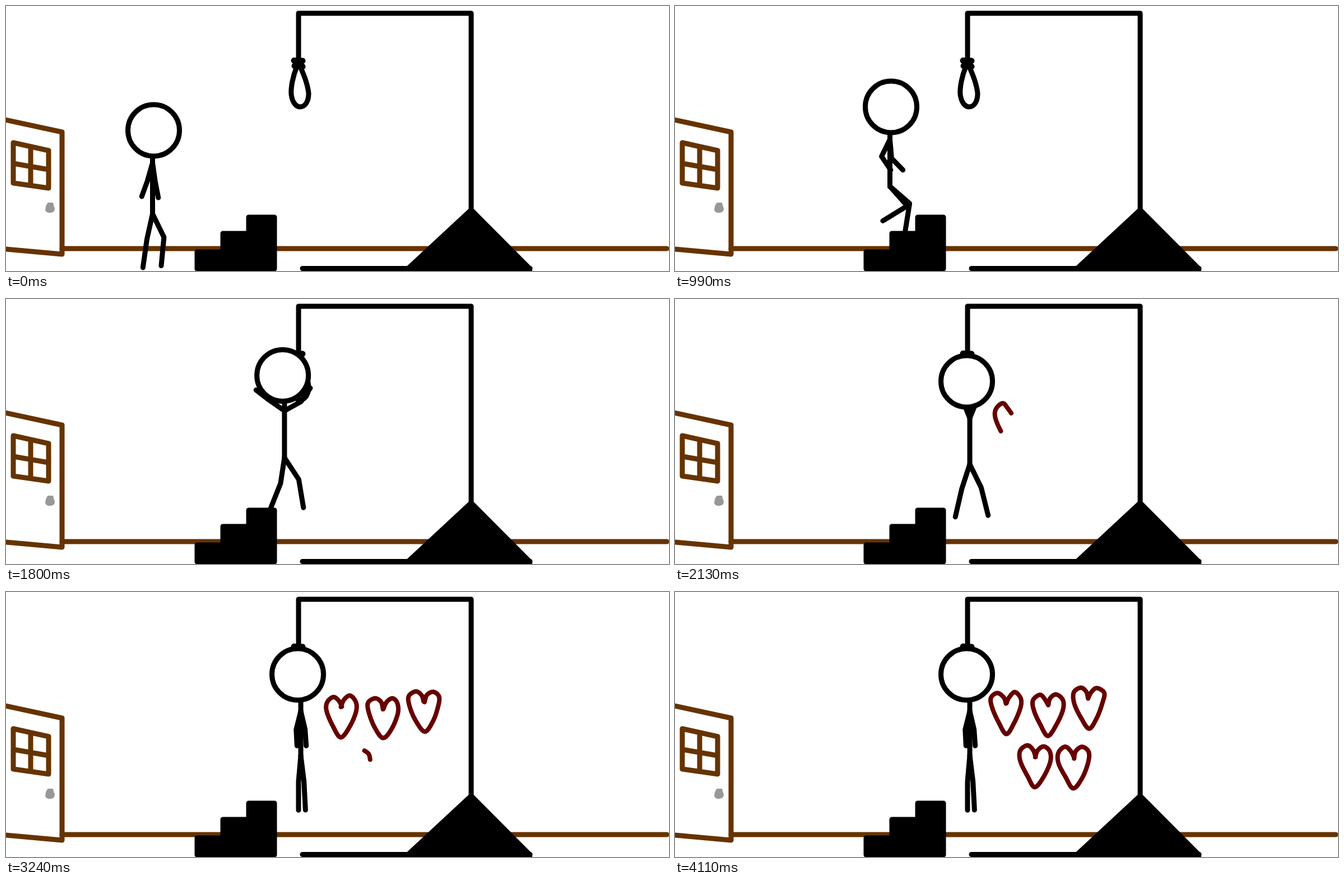
An HTML page with a canvas that plays this animation: 1183x473 px, repeating every 4500 ms.

```html
<!DOCTYPE html>
<html lang="en">
<head>
<meta charset="utf-8">
<title>Stick figure</title>
<style>
  html, body { margin: 0; width: 100%; height: 100%; overflow: hidden; background: #fff; }
  canvas { display: block; }
</style>
</head>
<body>
<canvas id="stage" width="1183" height="473"></canvas>
<script>
const ctx = document.getElementById('stage').getContext('2d');
const LOOP = 4500, BROWN = '#663300', RED = '#660000';
const LEAP = 1440, LANDING = 1890;

// Limbs hold upper and lower angles in degrees: 0 points down, + points right.
const raised = {
  head: [520.5, 147], hip: 148,
  arms: [[-158, -178], [158, 178]], legs: [[-18, -13], [26, 14]],
};
const poses = [
  { t: 0, head: [263.5, 222], hip: 149, arms: [[-16, -20], [8, 11]], legs: [[-12.5, -8], [26, -5.5]] },
  { t: 480, head: [317.5, 222], hip: 141, arms: [[-31, 41], [-5, 87]], legs: [[32, -47.5], [69, -12.5]] },
  { t: 990, head: [385.5, 180], hip: 142, arms: [[-26, 34], [5, 44]], legs: [[49, -9], [41.5, -58.5]] },
  { t: LEAP, head: [431, 147], hip: 144, arms: [[-49, -10], [29.5, 70]], legs: [[13, -42], [50, -1]] },
  { t: LANDING, ...raised },
  { t: 2130, ...raised },
  { t: 2700, head: raised.head, hip: 145, arms: [[-14, 3], [13, 4]], legs: [[-5, 0], [7, 3]] },
];

// Centre and top of each heart, and the outline of one half from notch to tip.
const hearts = [[591, 180], [665, 183], [738, 171], [643, 275], [711, 277]];
const half = [[0, .26], [.18, .1], [.55, 0], [.95, .13], [.92, .38], [.52, .74], [0, 1]];
const outline = [
  ...half.map(([x, y]) => [-x, y]),
  ...half.slice(0, -1).reverse(),
];

const clamp = v => Math.min(1, Math.max(0, v));
const polyline = points => 'M' + points.map(p => p.join(' ')).join('L');

function random(seed) {
  const v = Math.sin(seed * 12.9898) * 43758.5453;
  return v - Math.floor(v);
}

function stroke(path, color = '#000', width = 9) {
  ctx.strokeStyle = color;
  ctx.lineWidth = width;
  ctx.stroke(new Path2D(path));
}

function fill(path, color = '#000') {
  ctx.fillStyle = color;
  ctx.fill(new Path2D(path));
}

function drawRoom() {
  stroke('M100 433H1179', BROWN);
  stroke('M0 203.5L100 225V443L0 434', BROWN);
  stroke('M13 244L76 258V325L13 316ZM44 251V320M13 281L76 292', BROWN);
  fill('M75 351H84Q85 357 87 361Q87 368 82 368.5Q72 371 70 364Q71 354 75 351Z', '#98989a');
  stroke('M522 97V13H830V366');
  fill('M826 361.5H834L939 467V473H706Z');
  stroke('M529 468.5H935');
  stroke('M514 97.5L529 98M515 107L529 108', '#000', 11);
  stroke('M519 108C512 125 508 145 509 158C511 173 518 180 525 180C534 180 540 170 540 156C538 138 531 122 525 108');
  const stairs = 'M341 439H387V406H433V377H479V469H341Z';
  fill(stairs);
  stroke(stairs);
}

function mix(a, b, k) {
  return Array.isArray(a) ? a.map((v, i) => mix(v, b[i], k)) : a + (b - a) * k;
}

function poseAt(t) {
  const next = poses.findIndex(p => p.t > t);
  if (next < 0) return poses[poses.length - 1];
  const a = poses[next - 1], b = poses[next];
  const k = (t - a.t) / (b.t - a.t), leaping = a.t === LEAP;
  const blend = part => mix(a[part], b[part], leaping ? k ** 1.6 : k);
  const [x, y] = blend('head');
  const lift = leaping ? 18 * Math.sin(Math.PI * k) : 0;
  return { head: [x, y - lift], hip: blend('hip'), arms: blend('arms'), legs: blend('legs') };
}

function drawLimb([x, y], lengths, angles) {
  const points = [[x, y]];
  lengths.forEach((length, i) => {
    const a = angles[i] * Math.PI / 180;
    points.push([x += length * Math.sin(a), y += length * Math.cos(a)]);
  });
  stroke(polyline(points));
}

function drawFigure(t) {
  const { head: [x, y], hip: drop, arms, legs } = poseAt(t);
  const lean = -2 + 7.5 * clamp((x - 431) / 89);
  const shoulder = [x + lean, y + 60 + lean], hip = [x + lean, y + drop];
  stroke(polyline([[x + lean, y + 48], hip]));
  arms.forEach(angles => drawLimb(shoulder, [34, 29], angles));
  legs.forEach(angles => drawLimb(hip, [46.5, 51], angles));
  const circle = `M${x - 46} ${y}a46 46 0 1 1 92 0a46 46 0 1 1 -92 0Z`;
  fill(circle, '#fff');
  stroke(circle);
}

// Catmull-Rom curve through the points, cut off at the given progress.
function partialCurve(points, progress) {
  const last = points.length - 1, count = Math.ceil(progress * last * 8), out = [];
  const at = i => points[Math.min(last, Math.max(0, i))];
  for (let j = 0; j <= count; j++) {
    const u = progress * last * j / count, i = Math.min(last - 1, Math.floor(u)), s = u - i;
    out.push([0, 1].map(c => {
      const [a, b, d, e] = [at(i - 1)[c], at(i)[c], at(i + 1)[c], at(i + 2)[c]];
      return b + s / 2 * (d - a + s * (2 * a - 5 * b + 4 * d - e + s * (3 * (b - d) + e - a)));
    }));
  }
  return out;
}

// The hearts are redrawn every 30 ms at first, later after 30 and 60 ms in turn.
function drawingAt(t) {
  const since = Math.min(t, 4110) - 2760;
  if (since < 0) return Math.floor(since / 30);
  return 2 * Math.floor(since / 90) + (since % 90 >= 30 ? 1 : 0);
}

// Every other drawing sits lower and further right, with a slightly unsteady line.
function drawHearts(t) {
  const n = drawingAt(t), shift = n % 2 ? [8, 6] : [0, 0];
  hearts.forEach(([left, top], i) => {
    const progress = clamp((t - 1970 - 405 * i) / 400);
    if (progress === 0) return;
    const shaky = seed => 3 * random(seed + 31 * i + 173 * n) - 1.5;
    const points = outline.map(([x, y], j) => [
      left + shift[0] + 28 * x + shaky(j),
      top + shift[1] + 73 * y + shaky(j + 15),
    ]);
    stroke(polyline(partialCurve(points, progress)), RED, 8);
  });
}

function draw() {
  const t = Math.floor(performance.now() % LOOP / 30) * 30;
  ctx.fillStyle = '#fff';
  ctx.fillRect(0, 0, 1183, 473);
  ctx.lineCap = ctx.lineJoin = 'round';
  drawRoom();
  drawFigure(t);
  drawHearts(t);
  requestAnimationFrame(draw);
}
draw();
</script>
</body>
</html>
```
